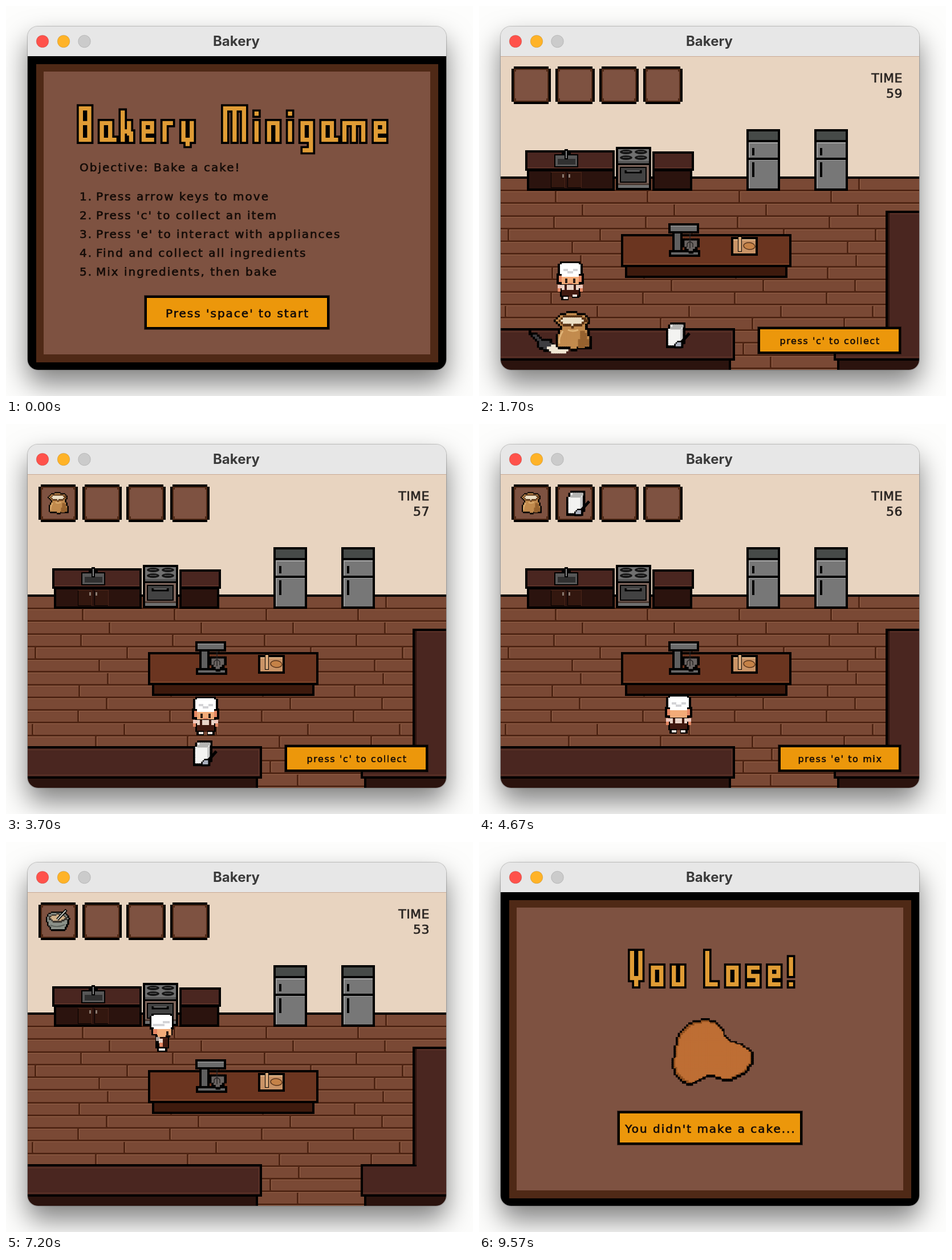
An HTML page with a canvas for the animation above (9.61 s loop, 819 px wide and 684 px high).

```html
<!DOCTYPE html>
<html lang="en">
<head>
<meta charset="utf-8">
<title>Bakery</title>
<style>
  html, body { margin: 0; width: 100%; height: 100%; overflow: hidden; background: #fdfdfc; }
  .window {
    position: absolute; left: 38px; top: 36px; width: 734px; height: 602px;
    border-radius: 18px; overflow: hidden; background: #e7e7e7;
    box-shadow: 0 0 1px 1px rgba(0,0,0,.22), 0 24px 48px rgba(0,0,0,.5);
  }
  canvas { position: absolute; left: -38px; top: -36px; }
</style>
</head>
<body>
<div class="window"><canvas id="stage" width="819" height="684"></canvas></div>
<script>
const LOOP = 9610, GAME_START = 600, GAME_END = 7700;
const FLOUR_TAKEN = 2300, SUGAR_TAKEN = 3900, MIXED = 5050;
const U = 3.67;
const COLOR = { ink: '#000', frame: '#4f2916', panel: '#7e5241', gold: '#ec970b', title: '#e09c35',
                counter: '#4a2620', base: '#2b130e', trim: '#65382b', steel: '#777' };

const stage = document.getElementById('stage').getContext('2d');
const probe = document.createElement('canvas').getContext('2d');
let ctx = stage;

function rect(color, x, y, w, h) {
  ctx.fillStyle = color;
  ctx.fillRect(x, y, w, h);
}
function framed(color, x, y, w, h, border = 4) {
  rect(COLOR.ink, x, y, w, h);
  rect(color, x + border, y + border, w - 2 * border, h - 2 * border);
}
function label(text, x, y, { size = 20, align = 'left', color = '#150c08', spacing = size / 10 } = {}) {
  ctx.font = `${size}px "DejaVu Sans", sans-serif`;
  ctx.letterSpacing = spacing + 'px';
  ctx.textAlign = align;
  ctx.fillStyle = ctx.strokeStyle = color;
  ctx.lineWidth = size / 30;
  ctx.fillText(text, x, y);
  ctx.strokeText(text, x, y);
}
// Fills a path in square cells, with an optional outline one cell wide.
function blocky(d, color, [x0, y0, x1, y1], outline = COLOR.ink, cell = U) {
  const path = new Path2D(d);
  const inside = (x, y) => probe.isPointInPath(path, x, y);
  for (let y = y0; y < y1; y += cell) for (let x = x0; x < x1; x += cell) {
    const cx = x + cell / 2, cy = y + cell / 2;
    if (!inside(cx, cy)) continue;
    const inner = inside(cx - cell, cy) && inside(cx + cell, cy) && inside(cx, cy - cell) && inside(cx, cy + cell);
    rect(inner || !outline ? color : outline, x, y, cell + 1, cell + 1);
  }
}
function line(color, width, d) {
  ctx.strokeStyle = color;
  ctx.lineWidth = width;
  ctx.stroke(new Path2D(d));
}

// Title lettering: centre lines on a grid whose baseline is y = 0.
const GLYPHS = {
  B: 'M0-15H4V0H0ZM0-8H4', M: 'M0 0V-15H9V0M4.5-15V0', Y: 'M0-15V-3H4V-15M2-3V0', L: 'M0-15V0H4',
  a: 'M0-8H4V0H0ZM4 0H6', e: 'M4 0H0V-8H4V-4H0', g: 'M4 0H0V-8H4V5H1', i: 'M0 0V-8M0-12.5h.01',
  k: 'M0-13V0M0-4H3V-8M3-4V-3H4V0', m: 'M0 0V-8H9V0M4.5-8V0', n: 'M0 0V-8H4V0', o: 'M0-8H4V0H0Z',
  r: 'M0 0V-8H3', s: 'M4-8H0V-4H4V0H0', u: 'M0-8V0H4V-8', y: 'M0-8V0H4V-8M2 0V2', '!': 'M0-12V-5M0 0h.01'
};
const advance = c => 'Mm'.includes(c) ? 15 : 'i!'.includes(c) ? 6 : c === 'r' ? 9 : 10;
function lettering(word, left, bottom) {
  const path = new Path2D();
  let x = 0;
  for (const c of word) {
    path.addPath(new Path2D(GLYPHS[c]), new DOMMatrix([1, 0, 0, 1, x, 0]));
    x += advance(c);
  }
  ctx.save();
  ctx.translate(left + 2 * U, bottom - 2 * U);
  ctx.scale(U, U);
  ctx.lineCap = 'square';
  for (const [color, width] of [[COLOR.ink, 4], [COLOR.title, 2]]) {
    ctx.strokeStyle = color;
    ctx.lineWidth = width;
    ctx.stroke(path);
  }
  ctx.restore();
}

function button(text, x, y, w, h, size) {
  rect('rgba(0,0,0,.45)', x - 1, y - 1, w + 2, h + 2);
  framed(COLOR.gold, x, y, w, h);
  label(text, x + w / 2 + 1, y + h / 2 + size * .4, { size, align: 'center' });
}
function panel() {
  rect(COLOR.ink, 38, 88, 734, 550);
  rect(COLOR.frame, 53, 102, 705, 523);
  rect(COLOR.panel, 66, 115, 678, 496);
}
function startScreen() {
  panel();
  lettering('Bakery', 124, 242);
  lettering('Minigame', 377, 242);
  label('Objective: Bake a cake!', 129, 290);
  ['Press arrow keys to move', "Press 'c' to collect an item", "Press 'e' to interact with appliances",
   'Find and collect all ingredients', 'Mix ingredients, then bake'].forEach((step, i) => {
    label(`${i + 1}.`, 129, 341 + 33 * i);
    label(step, 158, 341 + 33 * i);
  });
  button("Press 'space' to start", 243, 508, 324, 59, 20);
}
function loseScreen() {
  panel();
  lettering('You', 261, 257);
  lettering('Lose!', 393, 257);
  const dough = 'M347 342Q362 312 397 310Q426 312 431 338Q437 350 452 351Q482 362 482 380Q474 407 441 419Q425 419 408 411Q388 414 373 427Q357 427 341 404Q335 388 347 342Z';
  const area = [334, 309, 486, 430];
  blocky(dough, '#93511f', area);
  ctx.save();
  ctx.translate(410, 368);
  ctx.scale(.91, .89);
  ctx.translate(-410, -368);
  blocky(dough, '#be6e34', area, null);
  ctx.restore();
  button("You didn't make a cake...", 243, 472, 324, 59, 20);
}

function floorboards() {
  rect('#7a4935', 38, 303, 734, 335);
  const joints = [22, 134, 20, 131, 51, 2, 17, 128, 15, 126, 46, 157, 30, 141, 28];
  joints.forEach((offset, row) => {
    const bottom = Math.round(322 + 22.25 * row);
    rect('#4f2514', 38, bottom, 734, 3);
    rect('#98654b', 38, bottom + 3, 734, 1);
    for (let x = offset; x < 772; x += 161) {
      rect('#4f2514', x - 1, bottom - 19, 3, 19);
      rect('#98654b', x + 2, bottom - 18, 1, 17);
    }
  });
}
function counter(x, y, w, baseX, baseW) {
  framed(COLOR.base, baseX, 286, baseW, 38);
  framed(COLOR.counter, x, y, w, 289 - y);
  rect(COLOR.trim, x + 4, 283, w - 8, 1);
}
function sink() {
  for (const x of [126, 155]) {
    framed('#33170f', x, 291, 25, 28, 1);
    rect('#4b2418', x, 291, 25, 1);
    rect('#4b2418', x + 24, 291, 1, 28);
  }
  rect('#8a7a70', 146, 295, 3, 6);
  rect('#8a7a70', 157, 295, 3, 6);
  framed('#575757', 132, 260, 42, 23, 2);
  rect('#303030', 138, 268, 31, 10);
  rect(COLOR.ink, 150, 251, 6, 18);
  rect(COLOR.ink, 145, 256, 16, 6);
  rect('#888', 152, 254, 2, 13);
}
function stove() {
  framed('#707070', 240, 247, 62, 76);
  rect('#555', 244, 272, 54, 4);
  rect(COLOR.ink, 240, 276, 62, 3);
  for (const x of [258, 284]) for (const y of [256, 266]) {
    ctx.fillStyle = '#161616';
    ctx.beginPath();
    ctx.ellipse(x, y, 11, 4, 0, 0, 7);
    ctx.fill();
    rect('#666', x - 6, y - 1, 12, 1);
  }
  rect('#80675d', 244, 279, 54, 32);
  framed('#424242', 247, 282, 47, 28, 2);
  line(COLOR.ink, 3, 'M257 288v4h27v-4');
  rect('#888', 260, 289, 21, 1);
  rect('#4b3931', 244, 311, 54, 3);
}
function fridge(x) {
  framed(COLOR.steel, x, 216, 59, 108);
  rect('#464a48', x + 4, 220, 51, 15);
  rect(COLOR.ink, x, 235, 59, 4);
  rect('#aaa', x + 4, 239, 51, 2);
  rect(COLOR.ink, x, 266, 59, 4);
  rect('#aaa', x + 4, 270, 51, 1);
  rect('#999', x + 4, 240, 2, 26);
  rect('#999', x + 4, 270, 2, 50);
  rect(COLOR.ink, x + 10, 249, 4, 13);
  rect(COLOR.ink, x + 10, 274, 4, 26);
}
function table() {
  framed('#3e1a0d', 256, 453, 285, 24);
  framed('#6b3520', 249, 400, 299, 58);
  rect('#8c5030', 253, 452, 291, 1);
}
function mixer() {
  framed('#5f5f5f', 339, 394, 18, 38);
  framed('#6b6b6b', 332, 381, 54, 18);
  rect('#8a8a8a', 336, 385, 46, 2);
  framed('#666', 333, 428, 55, 12);
  blocky('M355 406H387Q387 431 371 433Q357 431 355 406Z', '#6a6462', [353, 404, 390, 434]);
  line('#2a2726', 1.5, 'M370 398V425M365 423V417Q370 410 375 417V423');
}
function board() {
  framed('#c99366', 442, 405, 47, 33);
  rect('#e2b88b', 446, 409, 39, 2);
  framed('#d9a878', 454, 404, 7, 27, 1);
  ctx.beginPath();
  ctx.ellipse(474, 421, 10, 6, .1, 0, 7);
  ctx.fillStyle = '#c58247';
  ctx.fill();
  ctx.strokeStyle = '#59341b';
  ctx.lineWidth = 1.5;
  ctx.stroke();
}
function foreground() {
  framed(COLOR.base, 30, 617, 412, 40);
  framed(COLOR.counter, 30, 565, 419, 57);
  rect(COLOR.trim, 38, 615, 407, 1);
  rect(COLOR.trim, 38, 571, 405, 1);
  rect(COLOR.trim, 443, 571, 1, 45);
  framed(COLOR.base, 628, 617, 160, 40);
  framed(COLOR.counter, 713, 359, 80, 262);
  framed(COLOR.counter, 622, 565, 160, 57);
  rect(COLOR.counter, 720, 555, 52, 20);
  rect('#2b130e', 717, 363, 3, 203);
  rect(COLOR.trim, 721, 364, 51, 1);
  rect(COLOR.trim, 626, 615, 146, 1);
}
function slot(x) {
  rect(COLOR.ink, x + 4, 106, 61, 66);
  rect(COLOR.ink, x, 110, 69, 58);
  rect(COLOR.frame, x + 4, 110, 61, 58);
  rect(COLOR.panel, x + 8, 112, 53, 54);
  rect(COLOR.panel, x + 6, 115, 57, 47);
}
function kitchen() {
  rect('#e8d4c0', 38, 88, 734, 212);
  rect('#c9a994', 38, 88, 734, 1);
  floorboards();
  rect(COLOR.ink, 38, 299, 734, 4);
  counter(81, 253, 157, 84, 154);
  counter(304, 255, 73, 304, 70);
  sink();
  stove();
  fridge(469);
  fridge(588);
  table();
  mixer();
  board();
  foreground();
  [57, 134, 211, 288].forEach(slot);
  clockLabel('TIME', 134);
}
function clockLabel(text, y) {
  label(text, 743, y, { size: 22, align: 'right', color: '#2b2623', spacing: .5 });
}

function sack() {
  blocky('M132 552Q140 536 165 536Q192 538 195 552L188 563Q198 578 198 598Q190 603 165 603Q140 603 133 596Q134 575 143 563Z', '#c28b4e', [131, 535, 200, 604]);
  blocky('M180 567Q192 578 192 596L172 599Z', '#96622f', [170, 566, 194, 600], null);
  blocky('M138 552Q148 541 166 541Q186 543 190 552Q176 563 163 563Q148 562 138 552Z', '#ecdfc5', [136, 539, 192, 565], '#5b3517');
  line('#e0b477', 3, 'M147 570Q139 582 141 592M156 568Q164 572 174 568');
}
function scoop() {
  blocky('M88 570L101 573L110 584L126 582L134 602L119 607L103 598L99 585L89 578Z', '#3d3d40', [87, 569, 136, 610]);
  blocky('M120 599L138 591L157 604L150 609L128 607Z', '#f0e6d3', [119, 590, 158, 610], null);
}
function sugar() {
  blocky('M328 567L337 556H361V590L355 600H329Z', '#f3f3f1', [328, 555, 362, 601]);
  blocky('M333 567L339 560H357L353 567Z', '#b5b5b3', [332, 559, 358, 568], null);
  rect('#c9c9c8', 353, 566, 4, 26);
  line(COLOR.ink, 5, 'M369 574L353 592');
  blocky('M342 592L351 587L359 591L353 600L343 600Z', '#aab0bd', [340, 585, 361, 602], COLOR.ink, 2.4);
}
function bowl() {
  blocky('M70 134Q72 122 90 122Q109 123 111 135Q108 149 101 156H81Q72 148 70 134Z', '#8b9189', [70, 120, 112, 158], COLOR.ink, 2.2);
  blocky('M74 133Q79 126 91 126Q104 127 107 134Q98 141 90 141Q80 140 74 133Z', '#d1b18a', [73, 125, 108, 142], '#3a352f', 2.2);
  line('#5f655f', 2, 'M78 146Q90 151 103 145');
  line(COLOR.ink, 5, 'M90 136L106 119');
  line('#c4c6bd', 2, 'M90 136L105 120');
}
function icon(draw, x, y, scale, fromX, fromY) {
  ctx.save();
  ctx.translate(x, y);
  ctx.scale(scale, scale);
  ctx.translate(-fromX, -fromY);
  draw();
  ctx.restore();
}

// Chef parts are placed from the centre of the hat's upper edge.
function chefWide(back, step) {
  rect(COLOR.ink, -18, 0, 36, 30);
  rect(COLOR.ink, -22, 4, 44, 18);
  rect(COLOR.ink, -24, 21, 48, 19);
  rect('#e48763', -20, 25, 40, 11);
  rect('#f2ab78', -15, 25, 30, 16);
  rect('#fff', -15, 3, 30, 24);
  rect('#fff', -18, 5, 36, 17);
  rect('#d3d3d6', -12, 13, 8, 4);
  rect('#d3d3d6', -5, 17, 10, 4);
  rect('#d3d3d6', 5, 13, 8, 4);
  if (!back) {
    rect('#302018', -9, 30, 4, 8);
    rect('#302018', 5, 30, 4, 8);
    rect('#c96f55', -4, 38, 8, 3);
  }
  rect(COLOR.ink, -18, 40, 36, 22);
  rect('#ead4c7', -15, 41, 30, 10);
  rect('#f0c9bd', -22, 41, 7, 6);
  rect('#f0c9bd', 15, 41, 7, 6);
  rect('#e48763', -22, 47, 5, 6);
  rect('#e48763', 17, 47, 5, 6);
  rect('#40190f', -15, 50, 30, 12);
  rect('#40190f', -10, 41, 4, 10);
  rect('#40190f', 6, 41, 4, 10);
  for (const side of [0, 1]) {
    const lift = step === side ? 4 : 0;
    rect(COLOR.ink, side ? 3 : -16, 60, 13, 8 - lift);
    rect('#eee3dc', side ? 4 : -12, 62 - lift, 8, 4);
  }
}
function chefSide(step) {
  rect(COLOR.ink, -18, 0, 36, 30);
  rect(COLOR.ink, -21, 4, 42, 24);
  rect(COLOR.ink, -18, 28, 37, 10);
  rect(COLOR.ink, -11, 36, 26, 6);
  rect('#e48763', -15, 27, 10, 9);
  rect('#f2ab78', -8, 27, 25, 11);
  rect('#fff', -18, 4, 36, 20);
  rect('#fff', -14, 2, 29, 3);
  rect('#fff', -14, 24, 30, 3);
  rect('#d3d3d6', -15, 18, 20, 4);
  rect('#d3d3d6', 2, 13, 12, 4);
  rect('#302018', 8, 31, 4, 8);
  rect('#f2ab78', -7, 37, 14, 4);
  rect(COLOR.ink, -11, 41, 24, 20);
  rect('#40190f', -3, 42, 14, 18);
  rect('#a99d97', -10, 41, 7, 7);
  rect('#ead4c7', -5, 44, 7, 8);
  rect('#e48763', -4, 51, 6, 7);
  rect(COLOR.ink, -8 + 3 * step, 59, 18 - 3 * step, 8);
  rect('#eee3dc', -5 + 3 * step, 61, 11, 4);
}
const ROUTE = [
  [600, 160, 340, 'down'], [950, 160, 340, 'down'], [1700, 160, 448, 'down'], [1850, 160, 478, 'down'],
  [2650, 160, 478, 'right'], [3030, 233, 478, 'right'], [3640, 350, 478, 'down'], [4050, 350, 478, 'up'],
  [4100, 350, 475, 'up'], [5100, 350, 475, 'left'], [5800, 218, 475, 'left'], [6105, 218, 421, 'up'],
  [6730, 218, 301, 'right'], [7020, 273, 301, 'right'], [7300, 273, 301, 'up'], [7700, 273, 301, 'up']
];
function chef(t) {
  const next = Math.max(1, ROUTE.findIndex(stop => stop[0] > t));
  const [t0, x0, y0, facing] = ROUTE[next - 1], [t1, x1, y1] = ROUTE[next];
  const k = (t - t0) / (t1 - t0);
  const moving = x0 !== x1 || y0 !== y1;
  const step = moving ? Math.floor(t / 130) % 2 : -1;
  ctx.save();
  ctx.translate(Math.round(x0 + (x1 - x0) * k), Math.round(y0 + (y1 - y0) * k));
  if (facing === 'left') ctx.scale(-1, 1);
  if (facing === 'left' || facing === 'right') chefSide(Math.max(0, step));
  else chefWide(facing === 'up', step);
  ctx.restore();
}

const room = document.createElement('canvas');
room.width = 819;
room.height = 684;
ctx = room.getContext('2d');
kitchen();
ctx = stage;

const between = (t, a, b) => t >= a && t < b;
function game(t) {
  ctx.drawImage(room, 0, 0);
  clockLabel(60 - Math.max(0, Math.floor((t - 150) / 1000)), 161);
  if (t < FLOUR_TAKEN) { scoop(); sack(); }
  if (t < SUGAR_TAKEN) sugar();
  if (between(t, FLOUR_TAKEN, MIXED)) icon(sack, 73, 120, .55, 131, 536);
  if (between(t, SUGAR_TAKEN, MIXED)) icon(sugar, 153, 118, .98, 328, 556);
  if (t >= MIXED) bowl();
  chef(t);
  if (between(t, 1500, FLOUR_TAKEN) || between(t, 3350, SUGAR_TAKEN)) button("press 'c' to collect", 489, 563, 251, 47, 16);
  if (between(t, 4100, MIXED)) button("press 'e' to mix", 525, 563, 215, 47, 16);
}
function titleBar() {
  rect('#e7e7e7', 38, 36, 734, 52);
  [['#ff524b', 64], ['#ffb328', 101], ['#cbcbcb', 137.5]].forEach(([color, x]) => {
    ctx.beginPath();
    ctx.arc(x, 62, 10.8, 0, 7);
    ctx.fillStyle = color;
    ctx.fill();
    ctx.strokeStyle = 'rgba(0,0,0,.13)';
    ctx.lineWidth = 1;
    ctx.stroke();
  });
  ctx.font = '700 24px Inter, sans-serif';
  ctx.letterSpacing = '0px';
  ctx.textAlign = 'center';
  ctx.fillStyle = '#3b3b3b';
  ctx.fillText('Bakery', 404, 70);
}

const startTime = performance.now();
function draw() {
  const t = (performance.now() - startTime) % LOOP;
  if (t < GAME_START) startScreen();
  else if (t < GAME_END) game(t);
  else loseScreen();
  titleBar();
  requestAnimationFrame(draw);
}
draw();
</script>
</body>
</html>
```
